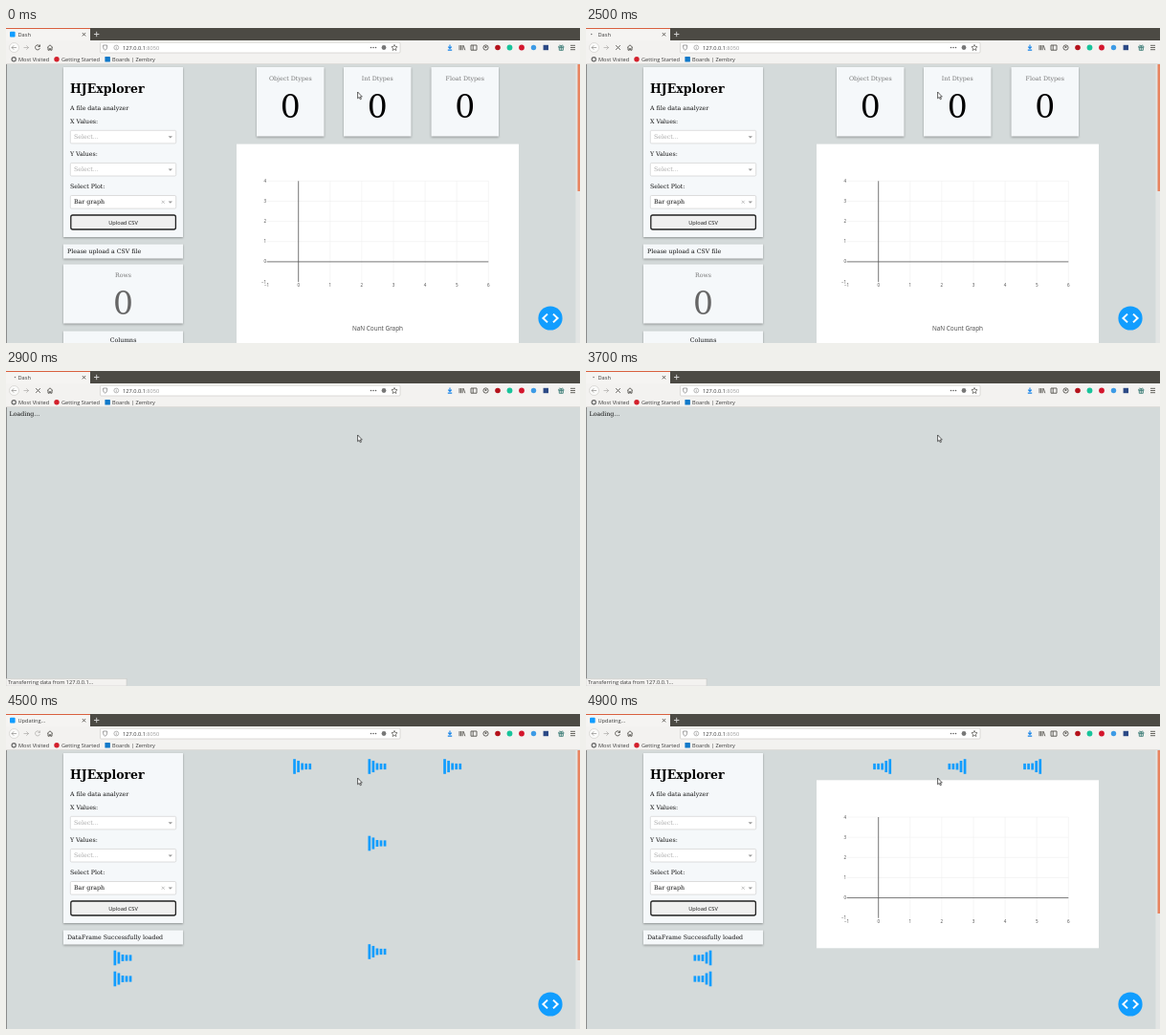
These frames come from a looping animation (600 by 330 pixels, 5 s). An HTML page:

```html
<!DOCTYPE html>
<html lang="en">
<head>
<meta charset="utf-8">
<title>Dashboard reload</title>
<style>
  html, body { margin: 0; width: 100%; height: 100%; overflow: hidden; }
  svg { display: block; width: 600px; height: 330px; }
  text { white-space: pre; }
  .ui { font: 5.65px "Open Sans", sans-serif; fill: #3a3a3a; }
  .page { font: 6.25px "DejaVu Serif", serif; fill: #111; }
  .head { font: bold 12.5px "DejaVu Serif", serif; fill: #000; }
  .big { font: 33px "DejaVu Serif", serif; }
  .tick { font: 4.5px "Open Sans", sans-serif; fill: #444; }
  .caption { font: 6.4px "Open Sans", sans-serif; fill: #444; }
  .mid { text-anchor: middle; }
  .end { text-anchor: end; }
  .icon { fill: none; stroke: #55534f; stroke-width: .9; }
  .pale { opacity: .35; }
  .card { fill: #f5f8fa; filter: drop-shadow(0 1.3px 1.2px #0005); }
</style>
</head>
<body>
<svg id="stage" viewBox="0 0 600 330"></svg>
<script>
const LOOP = 5000, RELOAD = 2500, STATUS = 2600, BLANK = 2900,
      LOADED = 4100, CONTENT = 4300, GRAPH = 4700, READY = 4800;
const BLUE = '#119dff';

const rect = (x, y, w, h, fill, extra = '') =>
  `<rect x="${x}" y="${y}" width="${w}" height="${h}" fill="${fill}" ${extra}/>`;
const dot = (x, y, r, fill, extra = '') =>
  `<circle cx="${x}" cy="${y}" r="${r}" fill="${fill}" ${extra}/>`;
const text = (x, y, cls, s, extra = '') =>
  `<text x="${x}" y="${y}" class="${cls}" ${extra}>${s}</text>`;
const icon = (d, extra = '') => `<path class="icon" d="${d}" ${extra}/>`;
const line = (x1, y1, x2, y2, color, width) =>
  `<path d="M${x1} ${y1}L${x2} ${y2}" stroke="${color}" stroke-width="${width}"/>`;
const group = (id, ...parts) => `<g id="${id}">${parts.join('')}</g>`;
const card = (x, y, w, h) => rect(x, y, w, h, '', 'class="card"');

function browser() {
  return [
    rect(0, 0, 600, 13, '#4c4a44'),
    rect(0, 0, 88, 14, '#f5f4f2'), rect(0, 0, 88, 1, '#d9603f'),
    rect(0, 13, 600, 25, '#f3f2f0'), rect(0, 37.4, 600, .6, '#d0cfcc'),
    `<clipPath id="tab"><path d="M0 1H88V13H0z"/></clipPath>`,
    `<circle id="burst" cx="7" cy="6.5" fill="#6fb4f0" clip-path="url(#tab)"/>`,
    rect(4, 3.8, 5.6, 5.6, BLUE, 'rx="1" id="favicon"'),
    `<circle id="throbber" cy="6.5" r=".8" fill="#777"/>`,
    text(12.5, 8.5, 'ui', 'Dash', 'id="tabTitle"'),
    icon('M79.8 5l3.4 3.4m0-3.4l-3.4 3.4'),
    icon('M92 6.5h5.4m-2.7-2.7v5.4', 'style="stroke:#ddd"'),
    // navigation buttons
    dot(8.5, 20.5, 5, '#fbfbfa', 'stroke="#c9c8c5" stroke-width=".6"'),
    icon('M11 20.5h-5m2.2-2.2l-2.2 2.2l2.2 2.2', 'opacity=".5"'),
    icon('M18.5 20.5h5m-2.2-2.2l2.2 2.2l-2.2 2.2', 'class="pale" opacity=".35"'),
    group('reload', icon('M35 18.8a2.5 2.5 0 1 0 .4 2.4M35.5 17.5v2h-2')),
    group('stop', icon('M31.2 18.2l4.6 4.6m0-4.6l-4.6 4.6')),
    icon('M43 20.6l3-2.8l3 2.8m-5 -.4v3h1.4v-1.6h1.2v1.6h1.4v-3'),
    // address field
    rect(98.5, 15.2, 313.5, 10.8, '#fff', 'rx="1" stroke="#c6c4c0" stroke-width=".6"'),
    icon('M101.6 18h4v2.2q0 2-2 3q-2-1-2-3z', 'style="stroke:#777;stroke-width:.7"'),
    dot(115.3, 20.5, 2.4, 'none', 'stroke="#888" stroke-width=".6"'),
    icon('M115.3 20v2m0-3.1v.6', 'style="stroke:#888;stroke-width:.6"'),
    text(122, 22.6, 'ui', '127.0.0.1<tspan fill="#999">:8050</tspan>'),
    [381.5, 384, 386.5].map(x => dot(x, 20.5, .75, '#555')).join(''),
    dot(395, 20.5, 2.4, '#777'),
    icon('M406 17.4l.9 2.1 2.2.2-1.7 1.5.6 2.3-2-1.2-2 1.2.6-2.3-1.7-1.5 2.2-.2z',
      'style="stroke-width:.7"'),
    // right toolbar
    icon('M464 17.4v4m-1.8-1.7l1.8 1.8 1.8-1.8m-4 3.4h4.4', 'style="stroke:#1683e8;stroke-width:1.1"'),
    icon('M474 18v5.2m1.6-5.2v5.2m1.6-5.2v5.2m1-5l1.6 5'),
    icon('M486 18h6v5.2h-6zm2.2 0v5.2'),
    dot(501.5, 20.5, 2.6, 'none', 'stroke="#55534f" stroke-width=".9"'),
    dot(501.5, 20, 1, '#55534f'),
    dot(514, 20.5, 2.8, '#b5121b'), dot(526.5, 20.5, 2.9, '#18c39a'),
    dot(539, 20.5, 2.9, '#d4152c'), dot(551.5, 20.5, 2.7, '#3d9be6'),
    rect(561.6, 17.8, 5.4, 5.4, '#2c4a86'),
    icon('M577.8 19h5v1.6h-5zm.5 1.6v2.7h4v-2.7m-2-1.6v4.3m0-4.3l-1.3-1.4m1.3 1.4l1.3-1.4',
      'style="stroke:#3d7d78"'),
    icon('M590 18.3h5m-5 2.2h5m-5 2.2h5'),
    // bookmarks
    dot(8.2, 32.8, 2.1, 'none', 'stroke="#666" stroke-width="1.2"'),
    text(13, 35, 'ui', 'Most Visited'),
    dot(53, 32.8, 2.7, '#d3202c'), text(58, 35, 'ui', 'Getting Started'),
    rect(103.4, 30, 5.5, 5.5, '#1279c9', 'rx=".6"'), text(111, 35, 'ui', 'Boards | Zembry')
  ].join('');
}

function select(y, label, value) {
  const empty = !value;
  return text(67, y - 7.7, 'page', label) +
    rect(67.3, y, 110.4, 13.6, '#fff', 'rx="1.3" stroke="#c8c8c8" stroke-width=".6"') +
    text(71, y + 8.7, 'page', value || 'Select...', empty ? 'style="fill:#aaa"' : '') +
    `<path d="M169.6 ${y + 6}h4.4l-2.2 2.3z" fill="#999"/>` +
    (empty ? '' : icon(`M162.7 ${y + 5.3}l3 3m0-3l-3 3`, 'style="stroke:#999;stroke-width:.6"'));
}

function form() {
  return card(60, 41, 125, 178) +
    text(67, 68.3, 'head', 'HJExplorer') +
    text(67, 86, 'page', 'A file data analyzer') +
    select(107.3, 'X Values:') + select(141.4, 'Y Values:') +
    select(175.5, 'Select Plot:', 'Bar graph') +
    rect(67.8, 196, 109.6, 15, '#efefef', 'rx="2" stroke="#222" stroke-width="1.3"') +
    text(122.5, 205.5, 'ui mid', 'Upload CSV', 'style="fill:#111"') +
    card(60, 226.5, 125, 15) + text(64, 236.3, 'page', '', 'id="message"');
}

const counter = (x, y, w, h, label, color) => card(x, y, w, h) +
  text(x + w / 2, y + 13.6, 'page mid', label, 'style="fill:#777"') +
  text(x + w / 2, y + 52.5, 'big mid', '0', `fill="${color}"`);

function axes() {
  const px = v => 305.7 + 33.1 * v, py = v => 123.3 - 21.15 * v;
  let out = '';
  for (let v = 1; v <= 6; v++) out += line(px(v), py(4), px(v), py(-1), '#eee', .6);
  for (let v = 1; v <= 4; v++) out += line(px(-1), py(v), px(6), py(v), '#eee', .6);
  out += line(px(0), py(4), px(0), py(-1), '#555', .8) + line(px(-1), py(0), px(6), py(0), '#555', .8);
  const name = v => String(v).replace('-', '−');
  for (let v = -1; v <= 6; v++) out += text(px(v), py(-1) + 4.9, 'tick mid', name(v));
  for (let v = -1; v <= 4; v++) out += text(272.2, py(v) + 1.6, 'tick end', name(v));
  return out;
}

const spinner = (x, y) => `<g transform="translate(${x} ${y})">` +
  [0, 1, 2, 3, 4].map(i => rect(i * 4.05 - 9.5, -7.8, 2.7, 15.6, BLUE, `class="bar" data-i="${i}"`)).join('') + '</g>';

const stage = document.getElementById('stage');
stage.innerHTML = [
  rect(0, 0, 600, 330, '#d4dada'),
  group('content',
    form(),
    group('counters',
      counter(262, 41, 70.5, 72.5, 'Object Dtypes', '#000'),
      counter(353, 41, 70.5, 72.5, 'Int Dtypes', '#000'),
      counter(444.5, 41, 70.5, 72.5, 'Float Dtypes', '#000'),
      counter(60, 247.5, 125, 62, 'Rows', '#666'),
      card(60, 317.5, 125, 30), text(122.5, 329.3, 'page mid', 'Columns')),
    group('graph',
      rect(241, 0, 295, 176, '#fff'), axes()),
    group('secondGraph',
      rect(241, 297, 295, 33, '#fff'), text(388.5, 316.5, 'caption mid', 'NaN Count Graph')),
    group('spinners', spinner(309.7, 55), spinner(388, 55), spinner(466.7, 55),
      spinner(122, 255.5), spinner(122, 277.5)),
    group('graphSpinners', spinner(388, 135.5), spinner(388, 249)),
    rect(595.5, 38, 4.5, 292, '#e3e5e4'),
    rect(597.5, 38, 2.5, 133, '#e8835f', 'id="thumb"'),
    dot(569, 304, 12.6, BLUE),
    `<path d="M566 299.6l-4.6 4.4 4.6 4.4m6-8.8l4.6 4.4-4.6 4.4" fill="none" stroke="#fff" stroke-width="2"/>`),
  group('loading', text(3.5, 46.8, 'page', 'Loading...')),
  rect(0, 38, .8, 292, '#777'),
  browser(),
  group('status',
    rect(0, 322.3, 126, 7.7, '#f3f2f0', 'stroke="#c4c3c0" stroke-width=".5"'),
    text(2, 328.3, 'ui', 'Transferring data from 127.0.0.1…')),
  `<path d="M367.6 67v6.8l1.6-1.4 1.1 2.4 1.1-.5-1.1-2.3h2z" fill="#fff" stroke="#222" stroke-width=".7"/>`
].join('');

const el = id => document.getElementById(id);
const show = (id, on) => { el(id).style.display = on ? '' : 'none'; };
const bars = [...document.querySelectorAll('.bar')];
const easeInOut = p => p * p * (3 - 2 * p);

// Each bar stretches for 480 ms of a 1200 ms cycle, 100 ms after its neighbour.
function barScale(t, i) {
  const phase = ((t - CONTENT + 40 - i * 100) % 1200 + 1200) % 1200;
  return .4 + .6 * easeInOut(Math.max(0, 1 - Math.abs(phase - 240) / 240));
}

function draw(t) {
  const before = t < BLANK, updating = t >= CONTENT, graphBack = t >= GRAPH;
  const busy = t >= RELOAD && t < LOADED, stopping = t >= RELOAD && t < CONTENT;

  show('content', before || updating);
  show('loading', !before && !updating);
  show('counters', before);
  show('secondGraph', before);
  show('spinners', updating);
  show('graphSpinners', updating && !graphBack);
  show('graph', before || graphBack);
  el('graph').setAttribute('transform', `translate(0 ${before ? 121.6 : 69.3})`);
  el('thumb').setAttribute('height', before ? 133 : graphBack ? 171 : 220);
  el('message').textContent = before ? 'Please upload a CSV file' : 'DataFrame Successfully loaded';

  show('status', t >= STATUS && t < LOADED);
  show('favicon', t < RELOAD || updating);
  show('throbber', busy);
  show('reload', !stopping);
  show('stop', stopping);
  el('stop').style.opacity = t < LOADED ? 1 : .35;
  el('reload').style.opacity = updating && t < READY ? .35 : 1;
  el('tabTitle').textContent = updating ? 'Updating...' : 'Dash';
  el('throbber').setAttribute('cx', 7 + 2.6 * Math.cos((t - 2850) / 1050 * 2 * Math.PI));

  const p = Math.min(1, Math.max(0, (t - LOADED) / 375)), spread = 1 - (1 - p) ** 1.75;
  el('burst').setAttribute('r', 81 * spread);
  el('burst').setAttribute('opacity', .9 * (1 - spread));

  if (updating) for (const bar of bars)
    bar.setAttribute('transform', `scale(1 ${barScale(t, +bar.dataset.i)})`);
}

const start = performance.now();
function tick() {
  draw((performance.now() - start) % LOOP);
  requestAnimationFrame(tick);
}
tick();
</script>
</body>
</html>
```
